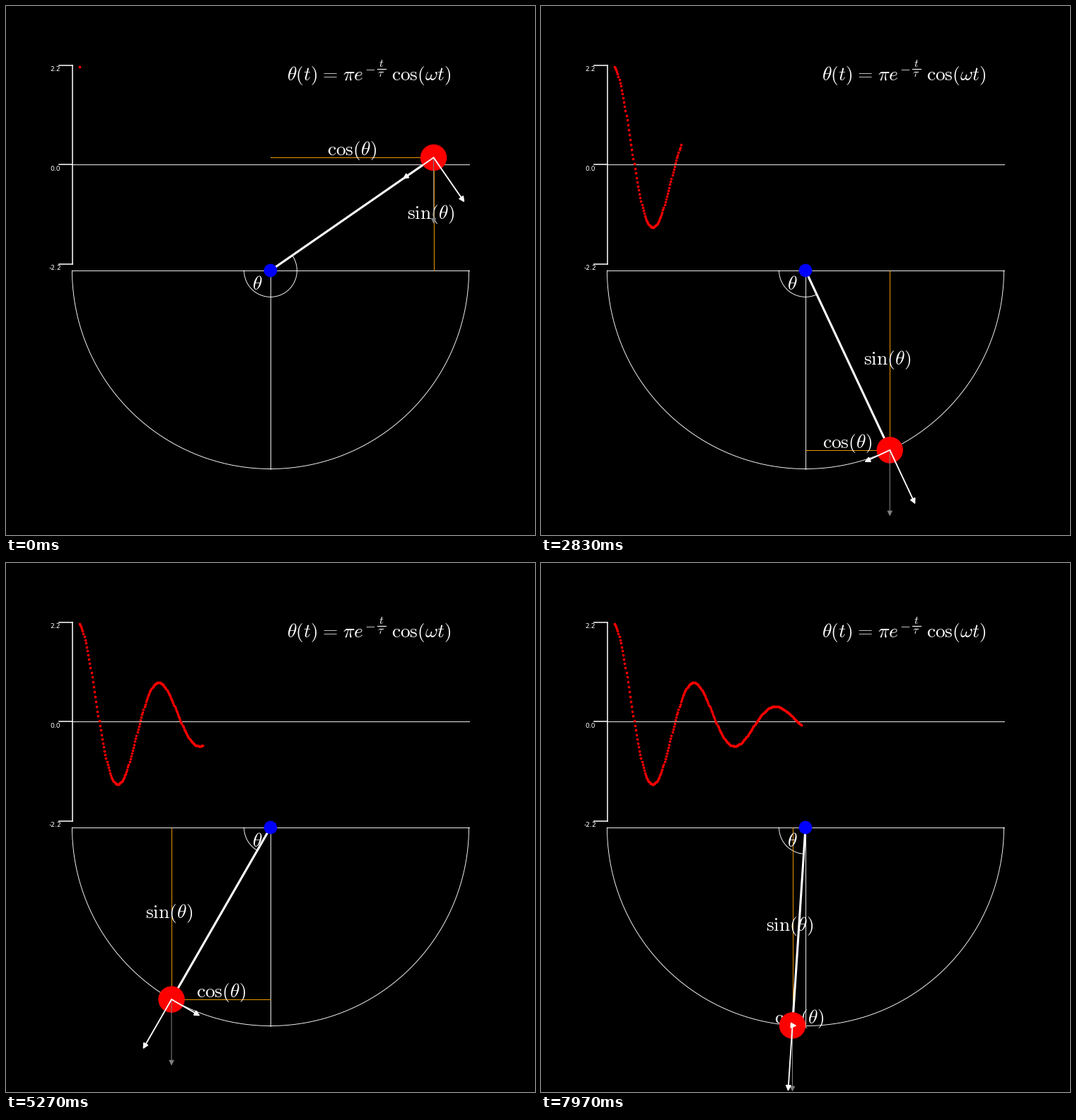
These frames come from a looping animation (748 by 748 pixels, 8000 ms). A matplotlib script:

```python
import numpy as np
import matplotlib.pyplot as plt
from matplotlib.animation import FuncAnimation
from matplotlib.patches import Circle, FancyArrowPatch

SIZE, DPI = 748, 110
LOOP_MS, TICK_MS, STEPS = 8000, 20, 240
AMP, OMEGA, DECAY = 2.2, 0.06, 0.009   # radians, per step
LENGTH, GRAVITY = 1.5, 0.5
PLOT_X, PLOT_Y, PLOT_H = -1.45, 0.8, 0.75
DOT_GAP = 2.95 / 500
THIN = 0.6

plt.rcParams["mathtext.fontset"] = "cm"
plt.rcParams["font.family"] = "DejaVu Sans"

fig = plt.figure(figsize=(SIZE / DPI, SIZE / DPI), dpi=DPI, facecolor="black")
ax = fig.add_axes([0, 0, 1, 1])
ax.set_xlim(-2, 2)
ax.set_ylim(-2, 2)
ax.axis("off")


def swing(n):
    return AMP * np.exp(-DECAY * n) * np.cos(OMEGA * n)


def line(xs, ys, lw=THIN, color="white", z=1):
    return ax.plot(xs, ys, color=color, lw=lw, zorder=z)[0]


def arc(radius, start, end):
    a = np.linspace(start, end, 120)
    return radius * np.cos(a), radius * np.sin(a)


def label(x, y, s, size=18, ha="center", va="center"):
    return ax.text(x, y, s, color="white", fontsize=size, ha=ha, va=va, zorder=3)


def formula_part(px, py, s, size=18, ha="left"):
    label(px / 187 - 2, 2 - py / 187, s, size, ha, "baseline")


def arrow(color, lw, z):
    a = FancyArrowPatch((0, 0), (0, -1), arrowstyle="-|>", mutation_scale=10,
                        shrinkA=0, shrinkB=0, color=color, lw=lw, zorder=z)
    return ax.add_patch(a)


# Graph axis
left = -LENGTH
line([left, left], [PLOT_Y - PLOT_H, PLOT_Y + PLOT_H], lw=1)
for value in (2.2, 0.0, -2.2):
    y = PLOT_Y + PLOT_H * value / AMP
    line([left - 0.1, left], [y, y], lw=1)
    label(-1.63, y - 0.03, f"{value:.1f}", 6)
line([left, LENGTH], [PLOT_Y, PLOT_Y])

# Pendulum guides
line([-LENGTH, LENGTH], [0, 0])
line([0, 0], [0, -LENGTH])
line(*arc(LENGTH, np.pi, 2 * np.pi))
label(-0.1, -0.1, r"$\theta$")

# Formula
formula_part(397, 104.6, r"$\theta(t)\hspace{0.08}=\hspace{0.08}\pi e$")
formula_part(514.3, 93.4, r"$-$", 12.6, "center")
formula_part(530.5, 85.8, r"$t$", 10.5, "center")
formula_part(530.5, 100.5, r"$\tau$", 10.5, "center")
line(np.array([525, 536.5]) / 187 - 2, [2 - 88.7 / 187] * 2, lw=0.75)
formula_part(545.3, 104.6, r"$\cos(\omega t)$")

# Moving parts
angle_arc = line([], [])
cos_line = line([], [], color="orange")
sin_line = line([], [], color="orange")
rod = line([], [], lw=2, z=2)
cos_text = label(0, 0, r"$\cos(\theta)$")
sin_text = label(0, 0, r"$\sin(\theta)$")
dots, = ax.plot([], [], "o", color="red", ms=2.4, mew=0, zorder=2)
bob = ax.add_patch(Circle((0, 0), 0.1, color="red", lw=0, zorder=4))
ax.add_patch(Circle((0, 0), 0.05, color="blue", lw=0, zorder=4))
weight = arrow("gray", 0.7, 5)
radial = arrow("white", 1.2, 6)
tangent = arrow("white", 1.2, 6)


def update(i):
    # Ticks are finer than steps, so each step starts close to its true time
    step = int((i + 0.75) * TICK_MS * STEPS / LOOP_MS)
    n = np.arange(1, step + 2)
    dots.set_data(PLOT_X + DOT_GAP * n, PLOT_Y + PLOT_H * swing(n) / AMP)

    phi = swing(step + 1)
    out = np.array([np.sin(phi), -np.cos(phi)])
    pos = LENGTH * out
    x, y = pos
    rod.set_data([0, x], [0, y])
    bob.center = (x, y)
    cos_line.set_data([0, x], [y, y])
    sin_line.set_data([x, x], [0, y])
    cos_text.set_position((x / 2, y + 0.05))
    sin_text.set_position((x - 0.02, y / 2))
    angle_arc.set_data(*arc(0.2, np.pi, 1.5 * np.pi + phi))

    down = np.array([0, -GRAVITY])
    pull = GRAVITY * np.cos(phi) * out
    for part, force in ((weight, down), (radial, pull), (tangent, down - pull)):
        part.set_positions(tuple(pos), tuple(pos + force))
    return ()


anim = FuncAnimation(fig, update, frames=LOOP_MS // TICK_MS, interval=TICK_MS,
                     init_func=lambda: update(0), repeat=True, repeat_delay=0)
plt.show()
```
